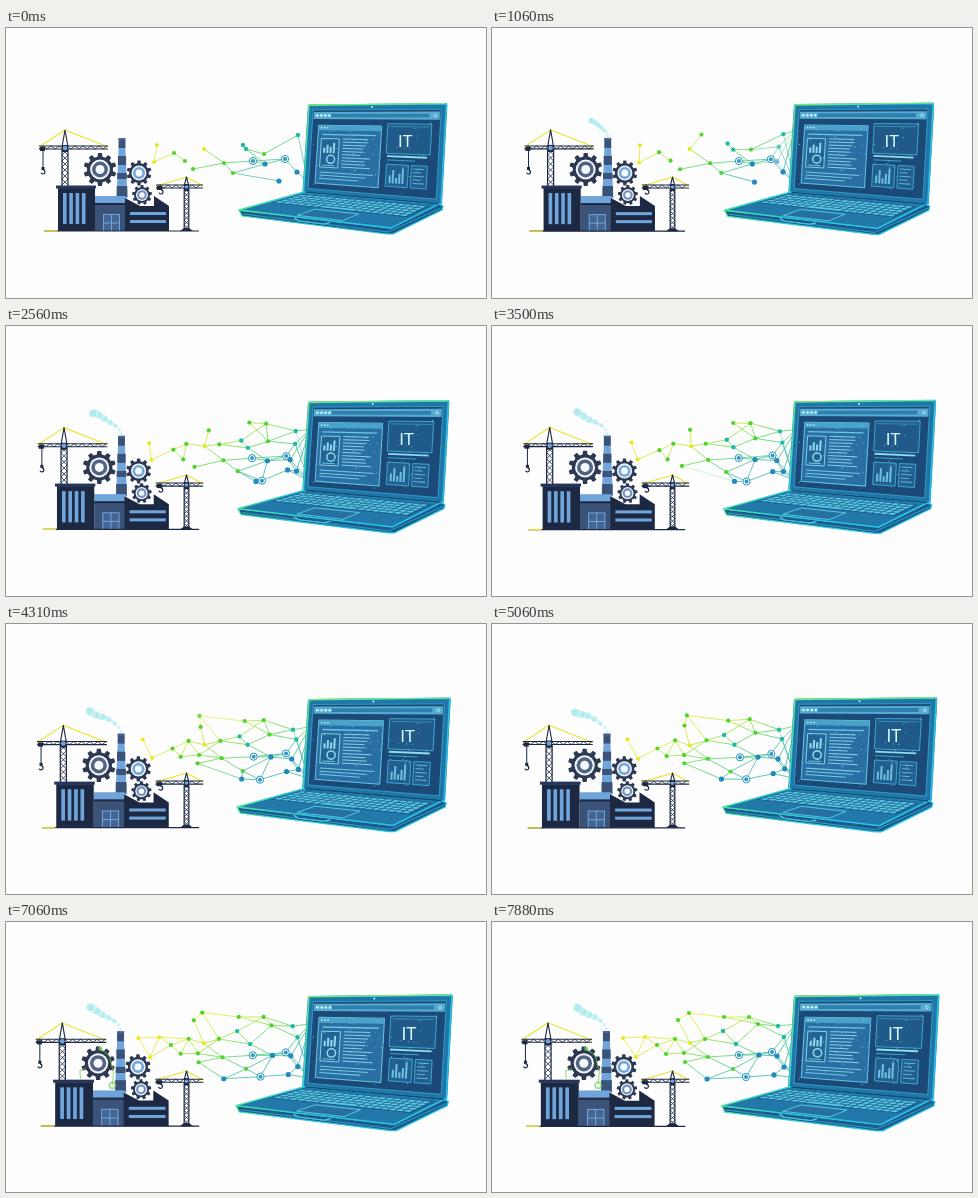
These frames come from a looping animation (480 px wide and 270 px high, 7.95 s). An HTML page with a canvas:

```html
<!DOCTYPE html>
<html lang="en">
<head>
<meta charset="utf-8">
<title>Factory to IT</title>
<style>
html, body { margin: 0; width: 100%; height: 100%; overflow: hidden; background: #fdfdfe; }
canvas { display: block; width: 100%; height: 100%; }
</style>
</head>
<body>
<canvas id="stage"></canvas>
<script>
const LOOP = 7950, W = 480, H = 270;
const canvas = document.getElementById('stage');
const ctx = canvas.getContext('2d');
const ratio = window.devicePixelRatio || 1;
canvas.width = W * ratio;
canvas.height = H * ratio;

const NAVY = '#1d2843', SLATE = '#3c5379', SKY = '#70a5dc', YELLOW = '#ece32a';
const clamp = (v, a = 0, b = 1) => Math.min(b, Math.max(a, v));
const mix = (a, b, k) => a + (b - a) * k;

function rect(x, y, w, h, color) {
  ctx.fillStyle = color;
  ctx.fillRect(x, y, w, h);
}
function poly(pts, fill, stroke, width = 1) {
  ctx.beginPath();
  pts.forEach(([x, y]) => ctx.lineTo(x, y));
  ctx.closePath();
  if (fill) { ctx.fillStyle = fill; ctx.fill(); }
  if (stroke) { ctx.strokeStyle = stroke; ctx.lineWidth = width; ctx.stroke(); }
}
function line(pts, color, width = 1) {
  ctx.beginPath();
  pts.forEach(([x, y]) => ctx.lineTo(x, y));
  ctx.strokeStyle = color;
  ctx.lineWidth = width;
  ctx.stroke();
}
function disc(x, y, r, fill, stroke, width = 1) {
  ctx.beginPath();
  ctx.arc(x, y, r, 0, Math.PI * 2);
  if (fill) { ctx.fillStyle = fill; ctx.fill(); }
  if (stroke) { ctx.strokeStyle = stroke; ctx.lineWidth = width; ctx.stroke(); }
}
function gradient(x0, y0, x1, y1, stops) {
  const g = ctx.createLinearGradient(x0, y0, x1, y1);
  stops.forEach(([at, color]) => g.addColorStop(at, color));
  return g;
}
function zoomed(cx, cy, scale, draw) {
  ctx.save();
  ctx.translate(cx, cy);
  ctx.scale(scale, scale);
  ctx.translate(-cx, -cy);
  draw();
  ctx.restore();
}
function random(seed) {
  const s = Math.sin(seed * 127.1) * 43758.5453;
  return s - Math.floor(s);
}

// ---- factory ----
function gear(x, y, r, teeth, core) {
  const pts = [];
  for (let i = 0; i < teeth; i++) {
    [[-.30, .79], [-.19, 1], [.19, 1], [.30, .79]].forEach(([o, k]) => {
      const a = (i + o) / teeth * Math.PI * 2 - Math.PI / 2;
      pts.push([x + Math.cos(a) * r * k, y + Math.sin(a) * r * k]);
    });
  }
  poly(pts, '#2d3953');
  disc(x, y, r * .6, '#f2f5fb');
  disc(x, y, r * .48, core);
  disc(x, y, r * .27, '#f6f9fd');
}

function truss(x, y, w, h, step) {
  const pts = [];
  for (let i = 0; i * step <= w; i++) pts.push([x + i * step, i % 2 ? y : y + h]);
  line(pts, NAVY, .8);
  line([[x, y], [x + w, y]], NAVY, 1);
  line([[x, y + h], [x + w, y + h]], NAVY, 1.1);
}

function mast(x, y, w, bottom, step) {
  line([[x, y], [x, bottom]], NAVY, 1.2);
  line([[x + w, y], [x + w, bottom]], NAVY, 1.2);
  for (let v = y; v + step <= bottom + 1; v += step) {
    line([[x, v], [x + w, v + step]], NAVY, .8);
    line([[x + w, v], [x, v + step]], NAVY, .8);
  }
}

function crane(x, top, deck, bottom, left, right, hook, half, drop) {
  mast(x - half, deck + 2, half * 2, bottom, half * 2);
  line([[left, deck], [x, top], [right, deck]], YELLOW, 1.1);
  line([[x - half, deck], [x, top], [x + half, deck]], NAVY, 1.1);
  truss(left, deck - 1, right - left, 3, 4);
  rect(x - half, deck - 2, half * 2, 7, NAVY);
  disc(x, deck + 1, half * .75, SKY);
  rect(left + 1, deck, 5, 4, NAVY);
  line([[hook, deck + 2], [hook, deck + drop - 5]], NAVY, 1);
  rect(hook - 1.5, deck + drop - 6, 3, 3, NAVY);
  ctx.beginPath();
  ctx.arc(hook, deck + drop - 1, 2, -1.5, 2.8);
  ctx.strokeStyle = NAVY;
  ctx.lineWidth = 1.2;
  ctx.stroke();
}

function chimney() {
  poly([[113, 111], [119, 111], [121.5, 170], [110.5, 170]], SKY);
  [[111, 9], [128, 9], [145, 6], [158, 11]].forEach(([y, h]) => {
    const grow = (y - 111) * .04;
    rect(112.6 - grow, y, 6.8 + grow * 2, h, SLATE);
  });
  rect(112.5, 110, 7, 2, '#4b6996');
}

function smoke(t) {
  const grow = clamp((t - 350) / 1200);
  if (!grow) return;
  const s = t / 1000;
  ctx.globalAlpha = .75 * clamp(grow * 3);
  for (let i = 0; i <= 15; i++) {
    const u = i / 15 * grow;
    const sway = Math.sin(s * 1.6 - u * 7) * 1.5 * u;
    const x = 116 - 30 * u + Math.sin(s * .9) * 2 * u;
    const y = 108 - 20 * Math.pow(u, .6) + sway;
    disc(x, y, 1.1 + u * 2.5 + Math.sin(i * 2.3) * .7, i % 3 ? '#c8f0f3' : '#a5e8ea');
  }
  ctx.globalAlpha = 1;
}

function factory(t) {
  crane(59, 102, 119, 158, 33, 102, 37, 3, 26);
  crane(180.5, 149, 158, 203, 150, 197, 155, 2.3, 7);
  poly([[174, 203], [178, 200], [183, 200], [187, 203]], NAVY);
  chimney();
  gear(94, 141.5, 16.5, 10, '#536483');
  gear(133, 145, 12.5, 10, '#74a8d8');
  rect(89, 168, 31, 10, SKY);
  rect(89, 176, 31, 27, SLATE);
  rect(89, 175, 31, 2, NAVY);
  gear(136, 167, 10, 9, '#6f91bb');
  poly([[119, 203], [119, 170], [134, 178], [148, 178], [148, 168], [163, 178], [163, 203]], NAVY);
  [184, 192].forEach(y => rect(124, y, 36, 3, SKY));
  rect(52, 160, 37, 43, NAVY);
  rect(50, 157.5, 40, 3, '#26365a');
  for (let i = 0; i < 4; i++) rect(57 + i * 6.3, 165, 3.6, 31, SKY);
  rect(97, 186, 17, 17, SKY);
  rect(98, 187, 15, 16, '#446592');
  line([[105.5, 186], [105.5, 203]], SKY);
  line([[97, 195], [114, 195]], SKY);
  line([[38, 203], [193, 203]], NAVY, 1.2);
  line([[38, 203], [51, 203]], YELLOW, 1.2);

  const glow = clamp((t - 4900) / 2000);
  if (glow) {
    ctx.globalAlpha = glow * .65;
    line([[77, 157], [76, 149], [82, 146]], '#74cf45', 1.1);
    line([[96, 127], [105, 134], [109, 150], [108, 163]], '#74cf45', 1.1);
    disc(96, 127, 2.2, '#66cc48');
    disc(108, 163, 3, null, '#66cc48', 1.6);
    ctx.globalAlpha = 1;
  }
}

// ---- network: start x, y, end x, y, appears at (s), look ----
const LOOKS = {
  y: ['#e8e81c', 2], g: ['#4fd42e', 2.1], t: ['#1fbba6', 2.2],
  b: ['#2489bd', 2.6], r: ['#3298bd', 3.6]
};
const LEFT = [
  [151, 117, 131, 116, 0, 'y'], [148, 134, 144, 135, 0, 'y'],
  [168, 125, 165, 123, 0, 'g'], [179, 133, 174, 132, 0, 'g'],
  [187, 141, 193, 140, 0, 'g'], [198, 121, 198, 121, 0, 'y'],
  [214, 109, 186, 98, .6, 'g'], [180, 117, 183, 117, 1.6, 'g'],
  [194, 134, 192, 131, 3.6, 'g'], [150, 116, 153, 115, 5.4, 'y'],
  [185, 91, 197, 91, 3.9, 'g']
];
const MIDDLE = [
  [273, 153, 215, 157, 0, 'b'], [218, 135, 216, 135, 0, 'g'],
  [227, 145, 241, 147, 0, 'g'], [237, 117, 231, 109, 0, 't'],
  [240, 121, 244, 122, 0, 't'], [247, 133, 247, 133, 0, 'r'],
  [250, 98, 232, 95, 1.5, 'g'], [262, 98, 257, 95, 1.5, 'g'],
  [259, 136, 267, 133, 0, 'b'], [258, 126, 266, 102, 0, 'g'],
  [257, 154, 254, 155, 1.9, 'r'], [215, 118, 213, 117, 1.7, 'g']
];
const RIGHT = [
  [279, 131, 280, 130, 0, 'r'], [292, 107, 286, 104, 0, 't'],
  [291, 144, 292, 145, 0, 'b'], [286, 119, 292, 115, .7, 't'],
  [281, 139, 282, 153, 2, 'b'], [285, 134, 285, 134, .8, 'b'],
  [302, 103, 305, 102, .5, 't'], [302, 154, 305, 156, 0, 't']
];
const NODES = [...LEFT, ...MIDDLE, ...RIGHT];

// Each node is tied to its two closest neighbours further right.
const LINKS = NODES.flatMap((a, i) => NODES
  .map((b, j) => ({ i, j, dx: b[2] - a[2], far: Math.hypot(b[2] - a[2], (b[3] - a[3]) * 1.3) }))
  .filter(l => l.dx > 7)
  .sort((p, q) => p.far - q.far)
  .slice(0, 2));

function network(t) {
  const k = 1 - Math.pow(1 - t / LOOP, 1.35), s = t / 1000;
  const drift = Math.sin(s * .4) * 1.1;
  const pts = NODES.map(([x0, y0, x1, y1, born, look], i) => ({
    x: mix(x0, x1, k) + Math.sin(s * 1.1 + i * 2.1) * drift,
    y: mix(y0, y1, k) + Math.sin(s * .9 + i * 1.7) * drift,
    a: born ? clamp((s - born) / .5) : 1,
    look
  }));
  const tint = gradient(195, 94, 225, 160,
    [[0, '#f0ec2c'], [.3, '#c6e83a'], [.55, '#6bdb50'], [.8, '#4fcf82'], [1, '#3cb9a4']]);
  LINKS.forEach(({ i, j }) => {
    const p = pts[i], q = pts[j];
    const far = Math.hypot(p.x - q.x, p.y - q.y);
    ctx.globalAlpha = Math.min(p.a, q.a) * clamp((60 - far) / 15) * .9;
    line([[p.x, p.y], [q.x, q.y]], tint, .9);
  });
  pts.forEach(p => {
    const [color, r] = LOOKS[p.look];
    ctx.globalAlpha = p.a;
    if (p.look === 'r') {
      disc(p.x, p.y, r, '#effafa', color, 1);
      disc(p.x, p.y, 2, color);
    } else {
      disc(p.x, p.y, r, color);
    }
  });
  ctx.globalAlpha = 1;
}

// ---- laptop ----
function lid(x, y) {
  const f = (y - 77) / 86, u = (x - 302) / 138;
  return [x - f * 5.5, y + u * mix(-1.5, 12, f)];
}
function panel(x, y, w, h, fill, stroke, width) {
  poly([lid(x, y), lid(x + w, y), lid(x + w, y + h), lid(x, y + h)], fill, stroke, width);
}
function rule(x, y, w, color, width = 1) {
  line([lid(x, y), lid(x + w, y)], color, width);
}
function bars(x, base, heights, color) {
  heights.forEach((h, i) => panel(x + i * 3.2, base - h, 2, h, color));
}

function screen(t) {
  const PALE = '#8fd6ea', CYAN = '#43b9de';
  panel(304, 78.5, 135.5, 84, '#1f76a8', '#1f76a8', 4);
  panel(303, 77.3, 137.5, 86.5, null, gradient(300, 76, 436, 175,
    [[0, '#5fe58a'], [.3, '#2fd6cf'], [1, '#25bdec']]), 1.5);
  panel(307.5, 82, 128, 78, '#1b4a78', '#3aa6cb', .8);
  panel(308.5, 84, 126, 7, '#55acd0');
  panel(326, 85.8, 98, 3.4, '#2f7fae');
  for (let i = 0; i < 4; i++) disc(...lid(312 + i * 4, 87.5), 1.2, '#d5f7fb');
  disc(...lid(430, 87.5), 1.3, null, '#d5f7fb', .7);

  panel(314, 97, 63, 57, '#2a6fa3', '#63c3e1', 1);
  panel(314, 97, 63, 5, '#4ba2c8');
  for (let i = 0; i < 3; i++) disc(...lid(317 + i * 3, 99.5), .8, '#d5f7fb');
  rule(318, 106, 54, '#6bc7e1', 1.3);
  panel(317.5, 110, 18, 28, '#226595', PALE, .9);
  bars(320, 124, [5, 8, 6, 10], PALE);
  disc(...lid(328, 130), 4, null, PALE, 1.5);
  rule(320, 136, 12, '#68c4df');
  for (let i = 0; i < 10; i++) rule(339, 110 + i * 3, 18 + random(i + 5) * 14, PALE, .9);
  for (let i = 0; i < 3; i++) rule(318, 143 + i * 3, 53 - i * 7, '#72c8e1', 1);

  panel(383, 95, 44, 27, '#1f5a89', CYAN, .8);
  rule(385, 97.5, 40, '#4097bd', .8);
  ctx.fillStyle = '#d6f6fa';
  ctx.font = '17px Roboto, Arial, sans-serif';
  ctx.textAlign = 'center';
  ctx.textBaseline = 'middle';
  ctx.fillText('IT', 399.3, 114);
  rule(384, 124.5, 40, '#8edcec', 1.8);
  rule(384, 128, 28, CYAN, .8);
  panel(384, 132, 22, 20, '#235f8e', CYAN, .8);
  bars(387, 149, [7, 12, 5, 9, 14], '#6bbfdc');
  panel(409, 132, 16, 20, '#235f8e', CYAN, .8);
  for (let i = 0; i < 5; i++) rule(411, 135 + i * 3.2, i % 2 ? 8 : 11, '#72c8e1', .8);

  for (let i = 0; i < 60; i++) {
    ctx.globalAlpha = .35 + .5 * Math.abs(Math.sin(t / 900 + i * 1.9));
    disc(...lid(309 + random(i + 1) * 125, 93 + random(i + 71) * 64), .55, '#7fe3ee');
  }
  ctx.globalAlpha = 1;
}

function deck(u, v) {
  const between = (a, b, k) => [mix(a[0], b[0], k), mix(a[1], b[1], k)];
  return between(between([298, 164], [433, 176], u), between([233, 182], [385, 200], u), v);
}
function tile(u0, v0, u1, v1, fill, stroke, width) {
  poly([deck(u0, v0), deck(u1, v0), deck(u1, v1), deck(u0, v1)], fill, stroke, width);
}

function base() {
  const edge = gradient(233, 0, 440, 0, [[0, '#45e5a0'], [.35, '#29c5df'], [1, '#25c9ee']]);
  poly([[233, 182], [385, 200], [433, 176], [437, 178], [436, 182], [387, 206], [381, 206], [236, 188]],
    '#1b5c8d', edge, 1.2);
  tile(0, 0, 1, 1, '#2279a9', edge, 1.3);
  tile(.03, .1, .97, .57, '#1b5c8d');
  const cols = 18, rows = 5;
  for (let r = 0; r < rows; r++) {
    for (let c = 0; c < cols; c++) {
      if (r === rows - 1 && c > 5 && c < 11) continue;
      const u = .04 + c * .051, v = .12 + r * .088;
      tile(u, v, u + .041, v + .066, '#58c8e0');
    }
  }
  tile(.04 + 6 * .051, .472, .04 + 11 * .051 - .011, .538, '#58c8e0');
  tile(.36, .64, .66, .94, '#2570a0', '#58cce2', .9);
  line([[288, 190], [293, 193], [318, 196], [324, 194.5]], '#6bdae6', 1);
  line([[237, 186], [382, 204], [435, 180]], '#3bb7d8', .7);
}

function laptop(t) {
  base();
  screen(t);
  line([lid(304, 77), lid(439, 77)], '#7ee87a', 1);
  line([lid(305, 163.8), lid(438, 163.8)], '#174a75', 1.6);
  disc(...lid(366, 79.5), 1, '#bdf5ef');
}

function render(t) {
  ctx.setTransform(ratio, 0, 0, ratio, 0, 0);
  ctx.lineJoin = 'round';
  rect(0, 0, W, H, '#fdfdfe');
  const k = t / LOOP;
  network(t);
  zoomed(180, 150, 1 + .025 * k, () => { smoke(t); factory(t); });
  zoomed(305, 141, 1 + .045 * k, () => laptop(t));
}

const start = performance.now();
function tick(now) {
  render(Math.max(0, now - start) % LOOP);
  requestAnimationFrame(tick);
}
render(0);
requestAnimationFrame(tick);
</script>
</body>
</html>
```
